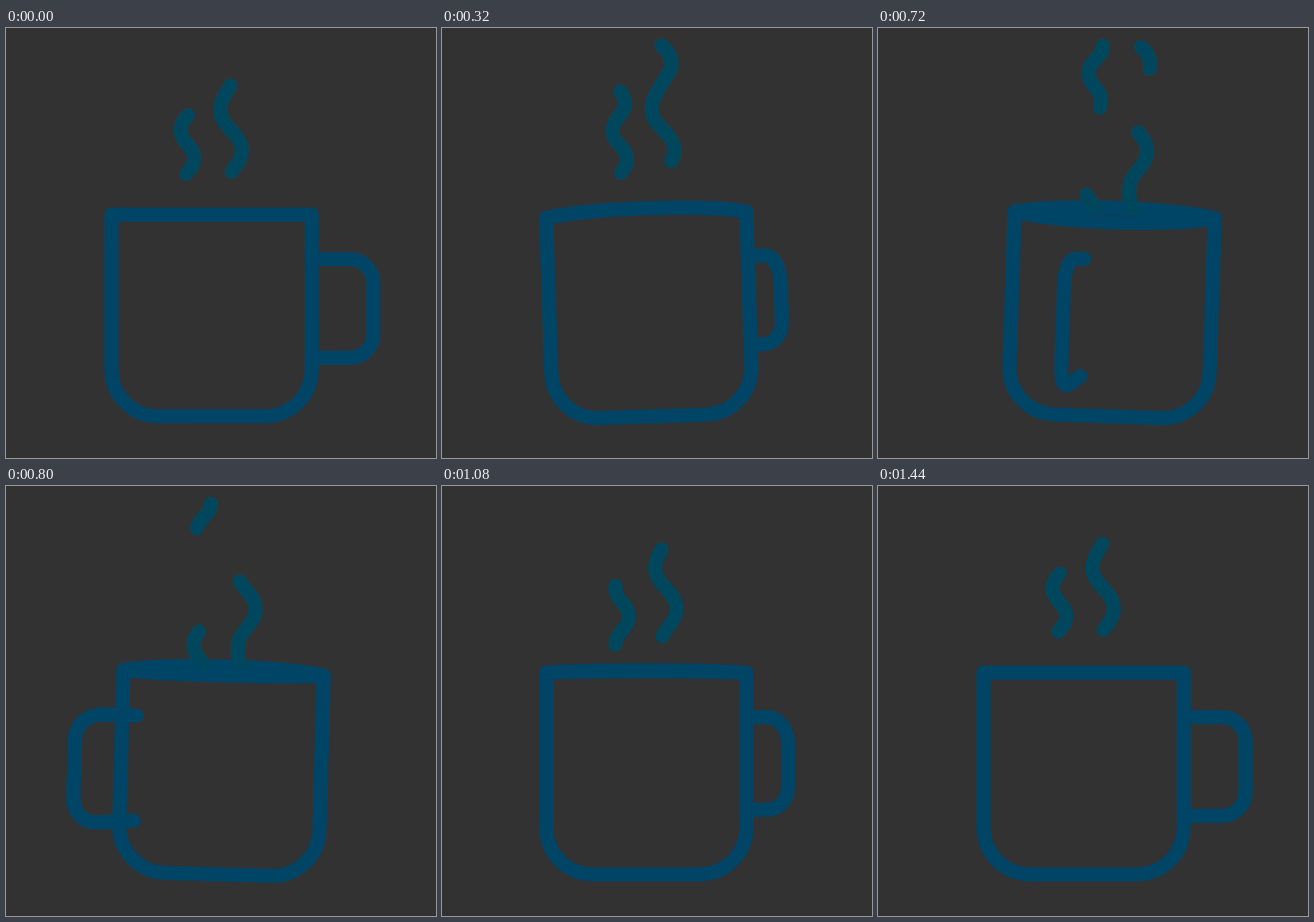
Recreate the animation shown at these times as an HTML page without scripts. Size 640x640 px, loop 1.64 s.

```html
<!DOCTYPE html>
<html lang="en">
<head>
<meta charset="utf-8">
<title>Spinning mug</title>
<style>
  html, body { margin: 0; width: 100%; height: 100%; overflow: hidden; background: #323232; }
  svg { display: block; width: 100%; height: 100%; }
  path {
    fill: none; stroke: #046; stroke-width: 21;
    stroke-linecap: round; stroke-linejoin: round;
  }
  .mug, .handle, .back-rim, .front-rim, .steam { animation: 1640ms linear infinite; }
  .mug { transform-origin: 306px 578px; animation-name: sway; }
  .body { fill: #323232; }
  .back-rim { animation-name: back-rim; }
  .front-rim { animation-name: front-rim; }
  .handle { animation-name: turn; }
  .near { animation: turn 1640ms linear infinite, near 1640ms step-end infinite; }
  .steam { stroke: #00475d; }
  .left.out { animation-name: left-out; }
  .left.in { animation-name: left-in; }
  .right.out { animation-name: right-out; }
  .right.in { animation-name: right-in; }

  /* The mug leans against its direction of travel. */
  @keyframes sway {
    0% { transform: translateX(0) rotate(0); }
    6.1% { transform: translateX(-8px) rotate(.8deg); }
    12.2% { transform: translateX(-17px) rotate(0); animation-timing-function: ease-in; }
    19.51% { transform: translateX(7.5px) rotate(-1.9deg); animation-timing-function: ease-out; }
    31.71% { transform: translateX(40.5px) rotate(0); }
    37% { transform: translateX(42px) rotate(.7deg); }
    43.9% { transform: translateX(36.5px) rotate(1.95deg); }
    48.78% { transform: translateX(10px) rotate(1.6deg); }
    52.44% { transform: translateX(-14px) rotate(0); }
    56.1% { transform: translateX(-8.5px) rotate(-1.9deg); animation-timing-function: ease-out; }
    65.85% { transform: translateX(-2px) rotate(0); animation-timing-function: ease-out; }
    87.8%, 100% { transform: translateX(0) rotate(0); }
  }

  @keyframes back-rim {
    0%, 87.8%, 100% { d: path("M157 278C217 278 395 278 455 278"); }
    19.51% { d: path("M157 278C217 265 395 265 455 278"); }
    31.71% { d: path("M157 278C197 251 415 251 455 278"); }
    43.9% { d: path("M157 278C217 264 395 264 455 278"); }
    56.1% { d: path("M157 278C217 268 395 268 455 278"); }
    65.85% { d: path("M157 278C217 273 395 273 455 278"); }
  }
  @keyframes front-rim {
    0%, 87.8%, 100% { d: path("M157 278C217 278 395 278 455 278"); }
    19.51% { d: path("M157 278C217 265 395 265 455 278"); }
    31.71% { d: path("M157 278C197 291 415 291 455 278"); }
    43.9% { d: path("M157 278C217 293 395 293 455 278"); }
    56.1% { d: path("M157 278C217 268 395 268 455 278"); }
    65.85% { d: path("M157 278C217 275 395 275 455 278"); }
  }

  @keyframes turn {
    0%, 87.8%, 100% { d: path("M455 344L512 344C531 344 547 360 547 379L547 456C547 475 531 491 512 491L455 491"); }
    0% { animation-timing-function: ease-in-out; }
    14.63% { d: path("M440 344L470 344C482 344 490 362 490 383L490 438C490 455 482 471 466 471L440 471"); }
    19.51% { d: path("M440 344L480 344C492 344 502 362 502 385L502 442C502 462 490 476 472 476L440 476"); animation-timing-function: ease-out; }
    27.44% { d: path("M455 345L515 345C534 345 550 361 550 382L550 462C550 483 534 497 515 497L455 496"); }
    31.71% { d: path("M440 346L497 345C517 345 532 362 532 384L532 470C532 492 518 506 497 506L440 500"); animation-timing-function: cubic-bezier(.35, .05, .8, .8); }
    43.9% { d: path("M264 345L253 345C243 345 236 360 236 387L236 500C236 525 238 540 250 532L264 520"); }
    48.78% { d: path("M178 345L130 345C104 345 87 361 87 384L87 468C87 492 102 506 122 506L178 502"); }
    53.05% { d: path("M200 344L160 344C135 344 125 361 125 380L125 450C125 470 140 484 160 484L200 484"); }
    56.1% { d: path("M240 344L225 344C215 344 205 360 205 380L205 440C205 460 215 470 225 470L240 470"); }
    60.98% { d: path("M380 344L385 344C395 344 400 360 400 380L400 440C400 460 395 470 385 470L380 470"); }
    65.85% { d: path("M440 344L485 344C503 344 517 362 517 385L517 445C517 467 503 482 485 482L440 482"); animation-timing-function: ease-out; }
  }
  @keyframes near {
    0%, 50.6%, 100% { visibility: hidden; }
    27.44% { visibility: visible; }
  }

  /* Dashes climb fixed waves; path length is counted in vertical pixels. */
  @keyframes left-out {
    0% { stroke-dasharray: 87 999; stroke-dashoffset: -103; }
    19.51% { stroke-dasharray: 120 999; stroke-dashoffset: -67; }
    31.71% { stroke-dasharray: 157 999; stroke-dashoffset: -3; }
    43.9% { stroke-dasharray: 92 999; stroke-dashoffset: 0; }
    52.44%, 100% { stroke-dasharray: 92 999; stroke-dashoffset: 94; }
  }
  @keyframes left-in {
    0%, 37.8% { stroke-dasharray: 110 999; stroke-dashoffset: -275; }
    43.9% { stroke-dasharray: 110 999; stroke-dashoffset: -221; }
    56.1% { stroke-dasharray: 110 999; stroke-dashoffset: -146; }
    65.85% { stroke-dasharray: 87 999; stroke-dashoffset: -122; animation-timing-function: ease-out; }
    87.8%, 100% { stroke-dasharray: 87 999; stroke-dashoffset: -103; }
  }
  @keyframes right-out {
    0% { stroke-dasharray: 130 999; stroke-dashoffset: -61; }
    19.51% { stroke-dasharray: 175 999; stroke-dashoffset: 0; }
    31.71% { stroke-dasharray: 131 999; stroke-dashoffset: 0; }
    43.9% { stroke-dasharray: 33 999; stroke-dashoffset: 0; }
    48%, 100% { stroke-dasharray: 33 999; stroke-dashoffset: 35; }
  }
  @keyframes right-in {
    0%, 20.7% { stroke-dasharray: 150 999; stroke-dashoffset: -275; }
    31.71% { stroke-dasharray: 150 999; stroke-dashoffset: -198; }
    43.9% { stroke-dasharray: 150 999; stroke-dashoffset: -130; }
    56.1% { stroke-dasharray: 160 999; stroke-dashoffset: -93; }
    65.85% { stroke-dasharray: 131 999; stroke-dashoffset: -70; animation-timing-function: ease-out; }
    87.8%, 100% { stroke-dasharray: 130 999; stroke-dashoffset: -61; }
  }
</style>
</head>
<body>
<svg viewBox="0 0 640 640">
  <defs>
    <path id="handle" class="handle" d="M455 344L512 344"/>
  </defs>
  <g class="mug">
    <path class="handle" d="M455 344L512 344"/>
    <path class="back-rim" d="M157 278H455"/>
    <path class="steam left out" pathLength="273" d="M280 27C280 45 260 50 260 68S280 92 280 110 260 134 260 152 280 176 280 194 260 218 260 237 280 262 280 280S274 292 270 300"/>
    <path class="steam left in" pathLength="273" d="M280 27C280 45 260 50 260 68S280 92 280 110 260 134 260 152 280 176 280 194 260 218 260 237 280 262 280 280S274 292 270 300"/>
    <path class="steam right out" pathLength="273" d="M337 27C346 34 351 44 351 56S319 98 319 122 351 158 351 182 326 214 326 240 338 276 345 300"/>
    <path class="steam right in" pathLength="273" d="M337 27C346 34 351 44 351 56S319 98 319 122 351 158 351 182 326 214 326 240 338 276 345 300"/>
    <path class="body" d="M157 278V508C157 547 188 578 227 578H385C424 578 455 547 455 508V278"/>
    <path class="front-rim" d="M157 278H455"/>
    <path class="handle near" d="M455 344L512 344"/>
  </g>
</svg>
</body>
</html>
```
